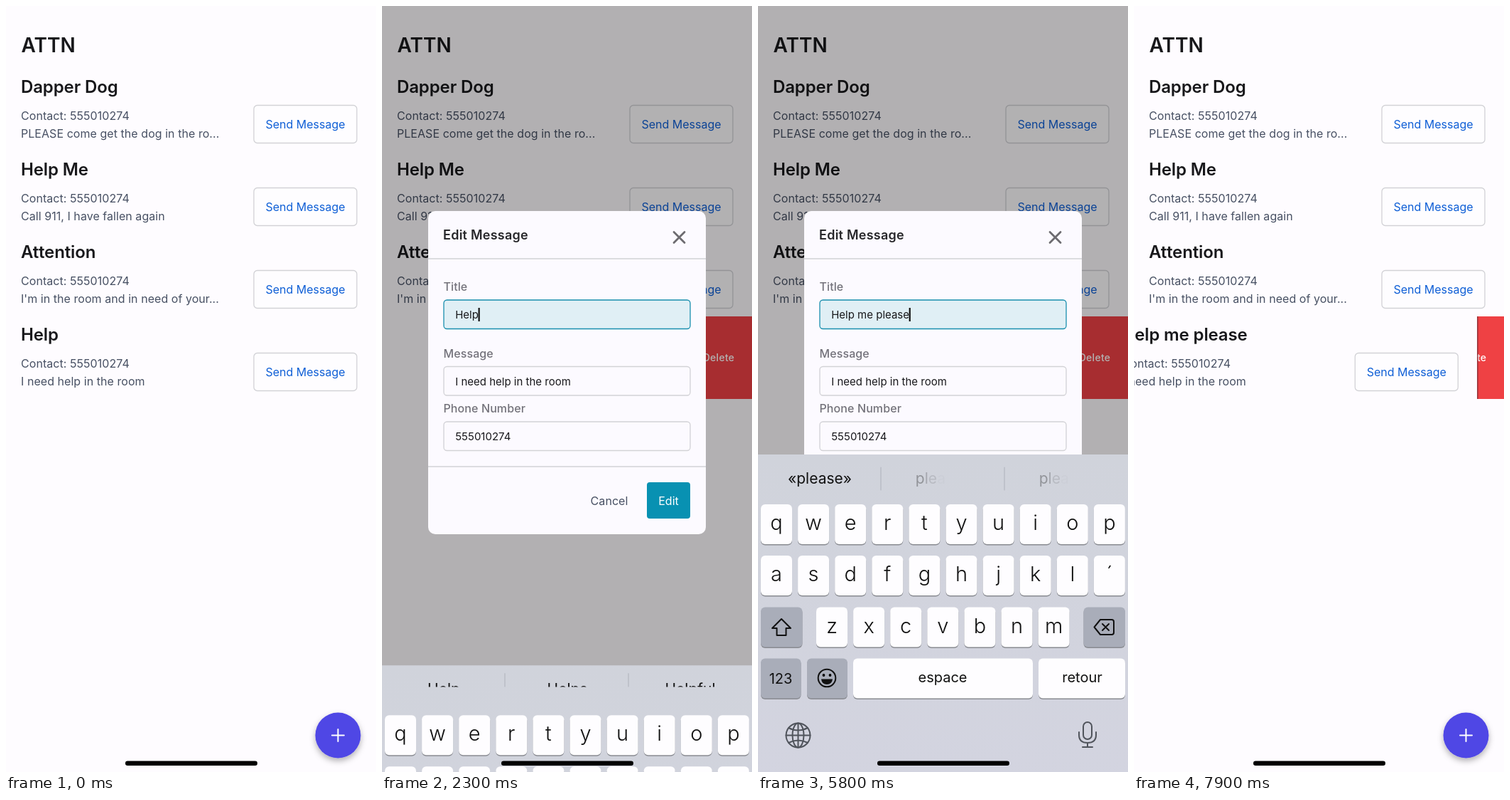
Recreate the animation shown at these times as an HTML page. Size 521 by 1076 pixels, loop 8000 ms.

```html
<!DOCTYPE html>
<html lang="en">
<head>
<meta charset="utf-8">
<title>Message list</title>
<style>
  html, body { margin: 0; width: 100%; height: 100%; overflow: hidden; background: #fefcff; }
  svg { display: block; width: 521px; height: 1076px; }
  text { font-family: Inter, "Open Sans", sans-serif; white-space: pre; }
  .mid { text-anchor: middle; }
  .head { font-size: 24px; font-weight: 600; letter-spacing: -.12px; fill: #18181b; }
  .body { font-size: 16px; letter-spacing: .05px; fill: #475063; }
  .send { font-size: 16px; fill: #0f5fd6; }
  .swipe { font-size: 14px; font-weight: 500; letter-spacing: .3px; }
  .label { font-size: 16px; font-weight: 500; letter-spacing: .1px; fill: #73727a; }
  .value { font-size: 15px; fill: #18181b; }
  .key { font-size: 29px; font-weight: 300; fill: #111; }
  .word { font-size: 21px; fill: #111; }
  .cap { font-size: 20px; fill: #111; }
  .line { fill: none; stroke-width: 2; stroke-linecap: round; stroke-linejoin: round; }
</style>
</head>
<body>
<svg id="stage" viewBox="0 0 521 1076"></svg>
<script>
const LOOP = 8000, HOLD = 120, PHONE = "555010274";
const GREY = "#a9adb9", WHITE = "#fefdff";

// Key presses in the title field: time and character
const presses = [[2800, " "], [3340, "m"], [3650, "e"], [3980, " "], [4300, "p"],
  [4580, "l"], [4840, "e"], [5080, "a"], [5320, "s"], [5540, "e"]];
// Suggestions after each typed character
const hints = ["Help Helps Helpful", "you me for", "«m» me my", "«me» men met", "to know when",
  "«p» please phone", "«pl» please place", "«ple» please plenty", "«plea» please plead",
  "«pleas» please pleas", "«please» pleased pleases"].map(s => s.split(" "));
const slots = [87, 261, 434];

const clamp = u => Math.max(0, Math.min(1, u));
const ramp = (t, start, length) => clamp((t - start) / length);
const smooth = u => u * u * (3 - 2 * u);

const text = (x, y, cls, str, more = "") => `<text x="${x}" y="${y}" class="${cls}" ${more}>${str}</text>`;
const rect = (x, y, w, h, r, fill, more = "") =>
  `<rect x="${x}" y="${y}" width="${w}" height="${h}" rx="${r}" fill="${fill}" ${more}/>`;
const path = (d, stroke, more = "") => `<path class="line" d="${d}" stroke="${stroke}" ${more}/>`;

function row(i, title, message) {
  const y = 88 + 116 * i;
  return rect(0, y, 521, 116, 0, "#fefcff")
    + text(21, y + 34, "head", title, `id="title${i}"`)
    + text(21, y + 72, "body", "Contact: " + PHONE)
    + text(21, y + 97, "body", message)
    + rect(349, y + 51.5, 145, 53, 5, "#fefdff", 'stroke="#d2d2d6" stroke-width="1.3"')
    + text(421.5, y + 84, "send mid", "Send Message");
}

function field(y, label, value, id) {
  return text(86.5, y - 13, "label", label)
    + rect(87, y, 347, 40.5, 4.5, "#fcfaff", `id="${id}Box" stroke="#d2d2d6" stroke-width="1.3"`)
    + text(103.2, y + 26, "value", value, `id="${id}"`);
}

// Keyboard geometry
const keys = {};
const addRow = (letters, x, y) => [...letters].forEach((c, i) => keys[c] = { x: x + 52.1 * i, y });
addRow("qwertyuiop", 4, 700);
addRow("asdfghjkl´", 4, 772);
addRow("zxcvbnm", 82, 844.5);

const keyBox = (x, y, w, fill, id = "") =>
  rect(x, y + 1.5, w, 56, 6, "#898b91") + rect(x, y, w, 56, 6, fill, id && `id="${id}"`);

function keyboard() {
  const letters = Object.entries(keys).map(([c, k]) =>
    keyBox(k.x, k.y, 44, WHITE) + text(k.x + 22, k.y + 36, "key mid", c)).join("");
  return rect(0, 630, 521, 460, 0, "url(#tray)")
    + `<g clip-path="url(#barClip)"><g id="bars">${path("M173 648V680M347 648V680", "#b4b7c0", 'style="stroke-width:1.2"')}</g>`
    + slots.map((x, i) => text(x, 671, "word mid", "", `id="hint${i}"`)).join("") + "</g>"
    + letters
    + keyBox(4, 844.5, 58.5, GREY) + keyBox(458.5, 844.5, 58.5, GREY)
    + keyBox(4, 916.5, 56.5, GREY) + keyBox(69, 916.5, 57, GREY)
    + keyBox(134, 916.5, 253, WHITE, "space") + keyBox(395, 916.5, 122, GREY, "enter")
    + text(32, 952, "cap mid", "123") + text(260, 950, "cap mid", "espace") + text(456.5, 950, "cap mid", "retour")
    + path("M33 861L46 874H39.5V884H26.5V874H20Z", "#111")
    + path("M482 862H498Q501 862 501 865V880Q501 883 498 883H482L473.5 872.5ZM485 868L494 877M494 868L485 877", "#111")
    + '<circle class="line" cx="97" cy="944" r="12.3" stroke="#111"/><circle cx="92.5" cy="940" r="1.9"/><circle cx="101.5" cy="940" r="1.9"/>'
    + '<path d="M89 945.5H105Q104 953 97 953Q90 953 89 945.5Z" fill="#111"/>'
    + '<circle class="line" cx="56.5" cy="1024.5" r="17" stroke="#50545c"/><ellipse class="line" cx="56.5" cy="1024.5" rx="8" ry="17" stroke="#50545c"/>'
    + path("M39.5 1024.5H73.5M56.5 1007.5V1041.5M43 1014Q56.5 1021 70 1014M43 1035Q56.5 1028 70 1035", "#50545c")
    + rect(458, 1006, 12, 24, 6, "none", 'stroke="#50545c" stroke-width="2"')
    + path("M452 1020V1024Q452 1035 464 1035Q476 1035 476 1024V1020M464 1035V1041M457 1041H471", "#50545c");
}

// Enlarged balloon over a pressed letter
function balloon(c) {
  const { x, y } = keys[c], l = x, r = x + 44, top = y - 87;
  const L = Math.max(3, Math.min(438, x - 17.5)), R = L + 80;
  const d = `M${L + 12} ${top}H${R - 12}Q${R} ${top} ${R} ${top + 12}V${top + 58}`
    + `C${R} ${top + 76} ${r} ${top + 74} ${r} ${top + 94}V${top + 137}Q${r} ${top + 143} ${r - 6} ${top + 143}`
    + `H${l + 6}Q${l} ${top + 143} ${l} ${top + 137}V${top + 94}C${l} ${top + 74} ${L} ${top + 76} ${L} ${top + 58}`
    + `V${top + 12}Q${L} ${top} ${L + 12} ${top}Z`;
  return `<path d="${d}" fill="${WHITE}" filter="url(#soft)"/>`
    + text((L + R) / 2, top + 54, "key mid", c, 'style="font-size:46px"');
}

const stage = document.getElementById("stage");
stage.innerHTML = `<defs>
    <linearGradient id="tray" x2="0" y2="1"><stop stop-color="#d0d3db"/><stop offset="1" stop-color="#d3d4e0"/></linearGradient>
    <filter id="soft" x="-30%" y="-30%" width="160%" height="170%"><feDropShadow dx="0" dy="1" stdDeviation="2.5" flood-opacity=".3"/></filter>
    <filter id="lift" x="-30%" y="-30%" width="160%" height="170%"><feDropShadow dx="0" dy="4" stdDeviation="4" flood-opacity=".3"/></filter>
    <clipPath id="barClip"><rect id="barRect" y="630" width="521" height="74"/></clipPath>
  </defs>`
  + rect(0, 0, 521, 1076, 0, "#fefcff")
  + text(21.5, 64.5, "head", "ATTN", 'style="font-size:28px;letter-spacing:0"')
  + row(0, "Dapper Dog", "PLEASE come get the dog in the ro...")
  + row(1, "Help Me", "Call 911, I have fallen again")
  + row(2, "Attention", "I'm in the room and in need of your...")
  + text(380.5, 499, "swipe mid", "Edit", 'fill="#98979b"')
  + rect(428, 436, 93, 116, 0, "#ef4144")
  + text(474, 499, "swipe mid", "Delete", 'fill="#fff"')
  + `<g id="front">${row(3, "Help", "I need help in the room")}</g>`
  + rect(0, 436, 1.2, 116, 0, "#7a2a30", 'id="edge"')
  + '<circle cx="467.5" cy="1024.5" r="32" fill="#4f46e5" filter="url(#lift)"/>'
  + path("M459 1024.5H476M467.5 1016V1033", "#fff")
  + rect(0, 0, 521, 1076, 0, "#000", 'id="shade"')
  + '<g id="modal">' + rect(65, 288, 391, 454, 10, "#fcfaff")
  + text(86, 328, "head", "Edit Message", 'style="font-size:18px;letter-spacing:.25px;fill:#27272a"')
  + path("M411 317.5L426 332.5M426 317.5L411 332.5", "#6d6b70", 'style="stroke-width:2.8"')
  + path("M65 355H456M65 647H456", "#d2d2d6", 'style="stroke-width:1.3;stroke-linecap:butt"')
  + field(413, "Title", "Help", "name") + field(506.5, "Message", "I need help in the room", "note")
  + field(584, "Phone Number", PHONE, "phone")
  + rect(0, 424, 2.2, 19, 0, "#111", 'id="caret"')
  + text(320, 700.5, "body mid", "Cancel")
  + rect(373, 669, 61, 51, 4, "#0891b2", 'id="save"') + text(403.5, 700.5, "body mid", "Edit", 'style="fill:#fff"')
  + "</g>"
  + `<g id="board">${keyboard()}<g id="pop"></g></g>`
  + rect(168, 1060.5, 186, 6.5, 3.2, "#000");

const el = Object.fromEntries([...stage.querySelectorAll("[id]")].map(e => [e.id, e]));
const set = (id, attrs) => { for (const k in attrs) el[id].setAttribute(k, attrs[k]); };

// Letters of a suggestion appear one after another
const reveal = (word, age) => [...word].map((c, i) =>
  `<tspan fill-opacity="${clamp((age - 25 * i) / 250).toFixed(2)}">${c}</tspan>`).join("");

function draw(t) {
  // Swiped row
  const shift = t < 7720 ? 200 * smooth(ramp(t, 60, 900)) : 200 * (1 - ramp(t, 7720, 320)) ** 2;
  set("front", { transform: `translate(${-shift})` });
  set("edge", { x: Math.max(428, 521 - shift), opacity: shift > .5 ? 1 : 0 });
  el.title3.textContent = t < 7700 ? "Help" : "Help me please";

  // Dialog
  set("shade", { opacity: .3 * (ramp(t, 1480, 250) - ramp(t, 7145, 420)) });
  set("modal", { opacity: ramp(t, 1520, 250) - ramp(t, 7140, 230) });
  const focus = t >= 2250 && t < 5920;
  set("nameBox", focus ? { fill: "#e0eff5", stroke: "#1a8fae" } : { fill: "#fcfaff", stroke: "#d2d2d6" });
  const typed = presses.filter(p => t >= p[0] + HOLD);
  el.name.textContent = "Help" + typed.map(p => p[1]).join("");
  set("caret", { x: 102.8 + el.name.getComputedTextLength(), opacity: focus ? 1 : 0 });
  set("save", { fill: t >= 6650 && t < 6850 ? "#155e75" : "#0891b2" });

  // Keyboard
  const up = 1 - (1 - ramp(t, 2250, 400)) ** 3 - smooth(ramp(t, 5920, 370));
  set("board", { transform: `translate(0 ${446 * (1 - up)})`, visibility: up > 0 ? "visible" : "hidden" });
  const rise = t < 4000 ? up : 1;
  set("barRect", { height: 8 + 66 * rise });
  set("bars", { transform: `translate(0 ${-10 * (1 - rise)})` });
  const shown = presses.filter(p => t >= p[0] + HOLD + 60).length;
  const age = shown ? t - presses[shown - 1][0] - HOLD - 60 : 1000;
  hints[shown].forEach((w, i) => el["hint" + i].innerHTML = reveal(w, i ? age : 1000));

  const down = presses.find(p => t >= p[0] && t < p[0] + HOLD);
  const char = down ? down[1] : "";
  set("space", { fill: char === " " ? GREY : WHITE });
  set("enter", { fill: t >= 5740 && t < 5900 ? WHITE : GREY });
  el.pop.innerHTML = keys[char] ? balloon(char) : "";
}

function tick() {
  draw(performance.now() % LOOP);
  requestAnimationFrame(tick);
}
tick();
</script>
</body>
</html>
```
